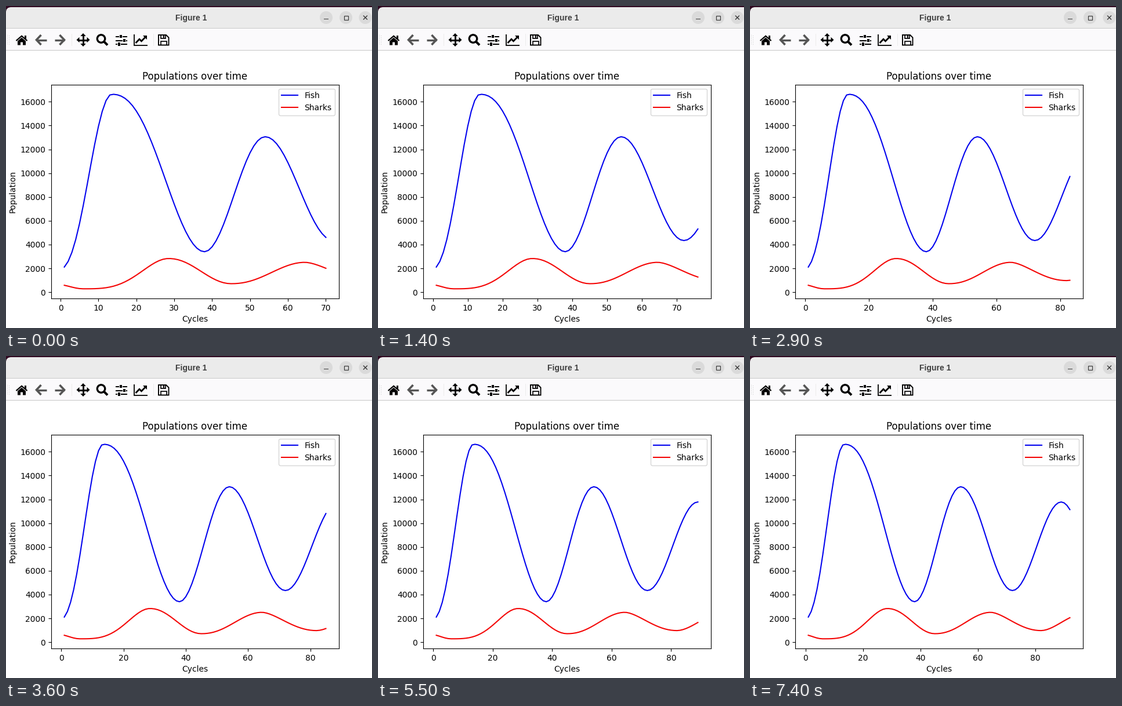
Write a matplotlib script that moves like this. It is 631x556 px and loops after 8000 ms.

```python
import numpy as np
import matplotlib.pyplot as plt
from matplotlib.animation import FuncAnimation
from matplotlib.patches import Circle, FancyBboxPatch, Polygon, Rectangle

W, H, DPI = 631, 556, 100
STEP, LOOP = 100, 8000
FIRST, LAST = 70, 95

# Turning points: (cycle, population, skew of the swing leading there)
FISH = [(-0.5, 1900, 1), (13.5, 16630, 1.15), (38, 3400, 1.17),
        (54, 13060, 0.97), (72, 4340, 1), (89, 11780, 1), (105, 4200, 1)]
SHARKS = [(-1, 650, 1), (6, 285, 1), (28.5, 2830, 1.6), (45, 715, 1.04),
          (64.5, 2510, 1.1), (82, 975, 0.82), (98, 2450, 0.9)]


def swing(c, points):
    """Skewed cosine waves through the turning points."""
    out = np.zeros(len(c))
    for (c0, v0, _), (c1, v1, skew) in zip(points, points[1:]):
        on = (c >= c0) & (c < c1)
        u = ((c[on] - c0) / (c1 - c0)) ** skew
        out[on] = v0 + (v1 - v0) * (1 - np.cos(np.pi * u)) / 2
    return out


cycles = np.arange(1, LAST + 1)
fish, sharks = swing(cycles, FISH), swing(cycles, SHARKS)

# Each further cycle takes about 0.2 s; after twelve the run slows down
k = np.arange(1, LAST - FIRST + 1)
late = np.clip(k - 12, 0, None)
done = (190 + 205 * k + 75 * late + 20 * late ** 2) // STEP

fig = plt.figure(figsize=(W / DPI, H / DPI), dpi=DPI, facecolor="white")

# Window chrome, in pixel coordinates with y pointing down
win = fig.add_axes([0, 0, 1, 1], zorder=-1)
win.set(xlim=(0, W), ylim=(H, 0))
win.axis("off")


def box(x0, y0, x1, y1, color):
    win.add_patch(Rectangle((x0, y0), x1 - x0, y1 - y0, fc=color, lw=0))


def path(points, width, color="black", closed=False):
    win.add_patch(Polygon(points, closed=closed, fill=False, ec=color,
                          lw=width * 72 / DPI, joinstyle="miter",
                          capstyle="butt"))


def shape(points, color="black"):
    win.add_patch(Polygon(points, fc=color, lw=0))


def title_bar():
    box(0, 0, W, 12, "#300a22")
    win.add_patch(FancyBboxPatch((0, 2), W + 30, 60, fc="#ebebeb", lw=0,
                                 boxstyle="round,pad=0,rounding_size=9"))
    box(0, 38, W, 39, "#c9c9c9")
    box(0, 39, W, 76, "#fbfafc")
    box(0, 76, W, 77, "#c6c6c6")
    box(0, 77, W, H, "white")
    win.text(318.8, 25, "Figure 1", ha="center", va="baseline", size=10,
             family="Liberation Sans", weight="bold", color="#3d3d3d")
    for x in (552, 586, 619.5):
        win.add_patch(Circle((x, 20), 11, fc="#dadada", lw=0))
    ink = "#3a3a3a"
    box(548, 22, 556, 23, ink)
    path([(582.5, 16.5), (589.5, 16.5), (589.5, 23.5), (582.5, 23.5)],
         1.2, ink, True)
    path([(616, 16.5), (623, 23.5)], 1.4, ink)
    path([(623, 16.5), (616, 23.5)], 1.4, ink)


def arrow(tip, d):
    gray = "#555555"
    path([(tip + 2 * d, 58.5), (tip + 19 * d, 58.5)], 3.4, gray)
    path([(tip + 10 * d, 50), (tip + 2 * d, 58.5), (tip + 10 * d, 67)],
         3.6, gray)


def toolbar():
    for y in range(50, 68, 3):
        box(2, y, 3, y + 1, "#cccccc")
        box(5, y + 1, 6, y + 2, "#cccccc")
    for x in (113, 254):
        box(x, 48, x + 1, 69, "#ececec")

    # home
    path([(17.5, 60), (27, 51.8), (36.5, 60)], 2.2)
    box(31.5, 51, 34.5, 57, "black")
    shape([(20, 60.5), (27, 54.5), (34, 60.5), (34, 67.5), (29, 67.5),
           (29, 62.5), (25, 62.5), (25, 67.5), (20, 67.5)])

    arrow(50.5, 1)
    arrow(102.5, -1)

    # pan
    cx, cy = 133, 58.5
    path([(cx - 8, cy), (cx + 8, cy)], 3)
    path([(cx, cy - 8), (cx, cy + 8)], 3)
    for s in (-1, 1):
        shape([(cx + 11.5 * s, cy), (cx + 6.5 * s, cy - 4.7),
               (cx + 6.5 * s, cy + 4.7)])
        shape([(cx, cy + 11.5 * s), (cx - 4.7, cy + 6.5 * s),
               (cx + 4.7, cy + 6.5 * s)])

    # zoom
    win.add_patch(Circle((164, 56.5), 6.7, fill=False, lw=2.4, ec="black"))
    path([(168.5, 61), (175, 67.5)], 4)

    # sliders
    for y, knob in ((52.5, 198), (59.5, 204), (66, 195)):
        path([(189, y), (knob - 3, y)], 2)
        path([(knob + 3, y), (209, y)], 2)
        box(knob - 2, y - 2.7, knob + 2, y + 2.7, "black")

    # axes editor
    path([(221, 49), (221, 67.5), (244, 67.5)], 1.8)
    path([(223.5, 64), (230, 57.2), (233.5, 60.7), (240.5, 53.5)], 2.8)
    shape([(236, 51), (243, 51), (243, 58)])

    # save
    path([(263, 50), (276, 50), (280.5, 54.5), (280.5, 67.5), (263, 67.5)],
         1.9, closed=True)
    path([(266.5, 50), (266.5, 56), (274.5, 56), (274.5, 50)], 1.7)
    box(271, 50, 273, 54.5, "black")
    path([(266.5, 67.5), (266.5, 61), (277, 61), (277, 67.5)], 1.7)


title_bar()
toolbar()

ax = fig.add_axes([78 / W, 50.8 / H, 496 / W, 369.6 / H])
fish_line, = ax.plot([], [], color="#0404ee", label="Fish")
shark_line, = ax.plot([], [], color="#f40404", label="Sharks")
ax.set(title="Populations over time", xlabel="Cycles", ylabel="Population",
       ylim=(-537, 17447))
ax.legend(loc="upper right")


def update(frame):
    n = FIRST + np.searchsorted(done, frame, side="right")
    fish_line.set_data(cycles[:n], fish[:n])
    shark_line.set_data(cycles[:n], sharks[:n])
    margin = 0.05 * (n - 1)
    ax.set_xlim(1 - margin, n + margin)
    return fish_line, shark_line


anim = FuncAnimation(fig, update, frames=LOOP // STEP, interval=STEP,
                     init_func=lambda: update(0), repeat=True, repeat_delay=0)
plt.show()
```
